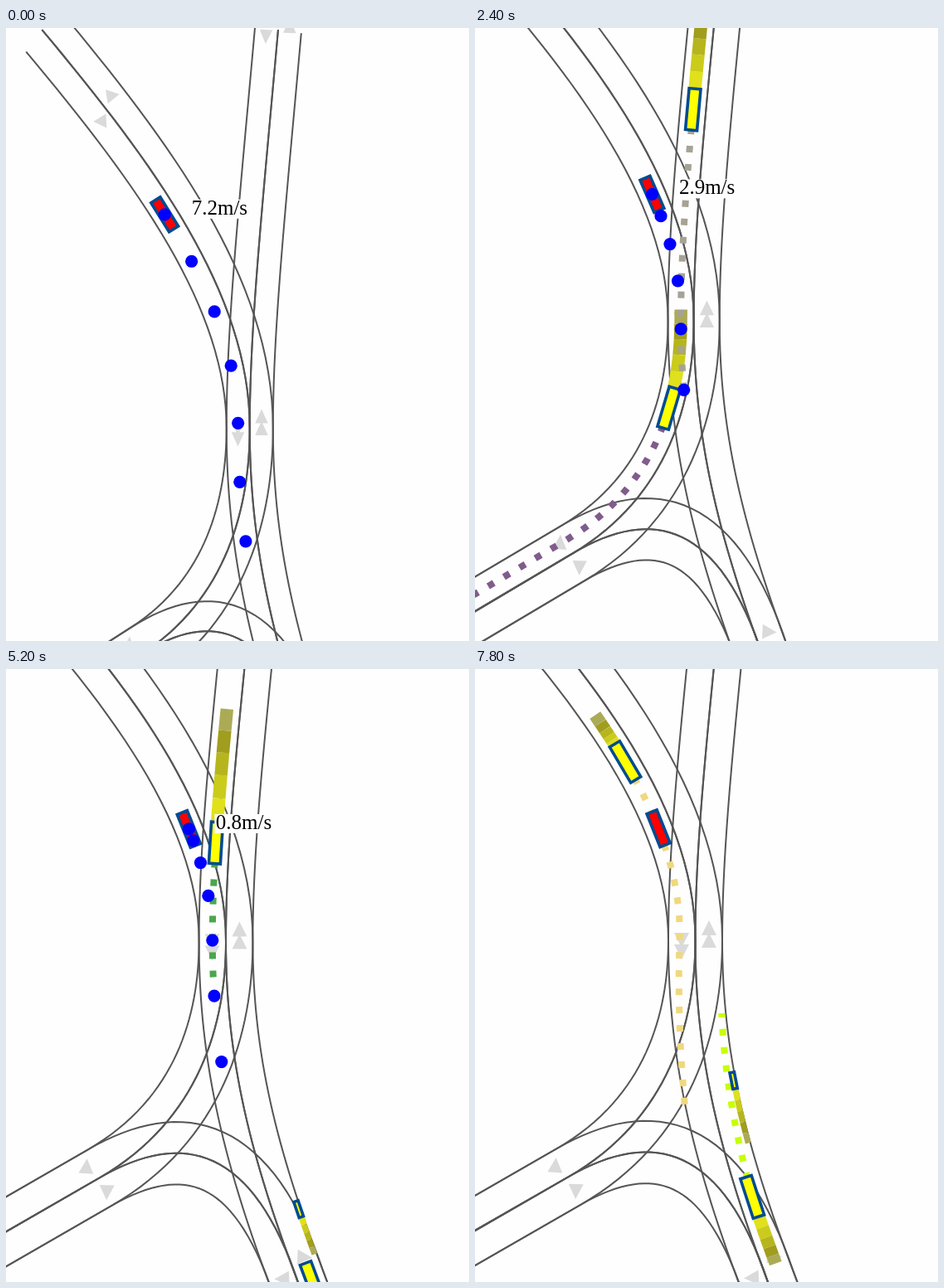
An HTML page with a canvas for the animation above (7.9 s loop, 558x739 px).

```html
<!DOCTYPE html>
<html>
<head>
<meta charset="utf-8">
<title>Merging traffic</title>
<style>
html, body { margin: 0; width: 100%; height: 100%; overflow: hidden; background: #fefefe; }
canvas { display: block; }
</style>
</head>
<body>
<canvas id="stage" width="558" height="739"></canvas>
<script>
const ctx = document.getElementById('stage').getContext('2d');
const LOOP = 7900, STEP = 100, STOP = 5.7;
const LANE = 32.5, ASPECT = 1.16; // the map is a little taller than wide

// Cubic curve as a list of points
function curve(a, b, c, d) {
  return Array.from({ length: 33 }, (_, i) => {
    const u = i / 32, v = 1 - u;
    return [0, 1].map(k => v * v * v * a[k] + 3 * u * v * v * b[k] + 3 * u * u * v * c[k] + u * u * u * d[k]);
  });
}

// Parallel curve to the right of the direction of travel
function offset(pts, dist) {
  return pts.map(([x, y], i) => {
    const a = pts[Math.max(0, i - 1)], b = pts[Math.min(pts.length - 1, i + 1)];
    const dx = b[0] - a[0], dy = (b[1] - a[1]) / ASPECT, n = dist / Math.hypot(dx, dy);
    return [x - dy * n, y + dx * n * ASPECT];
  });
}

const merge = [265.5, 327], fork = [113, 612], westEnd = [-80, 723], southEnd = [353, 739];
const northIn = curve([305.2, -174], [283, 50], [265.5, 200], merge);
const westIn = curve([-25, -174], [131, -6], [265.5, 157], merge);
const southOut = [...curve(merge, [265.5, 470], [296, 589], southEnd), [371, 787]];
const westOut = [...curve(merge, [265.5, 425], [234.4, 542], fork), westEnd];
const bend = [westEnd, ...curve(fork, [215.3, 553], [298, 576], southEnd), [371, 787]];
const join = (a, b) => [...a, ...b.slice(1)];
const roads = [join(northIn, southOut), join(westIn, westOut), bend];

// A lane that can be looked up by distance or by height
function makeRoute(centre, side = LANE / 2) {
  const pts = offset(centre, side), sum = [0];
  for (let i = 1; i < pts.length; i++)
    sum[i] = sum[i - 1] + Math.hypot(pts[i][0] - pts[i - 1][0], pts[i][1] - pts[i - 1][1]);
  const lerp = (i, u) => [0, 1].map(k => pts[i][k] + (pts[i + 1][k] - pts[i][k]) * u);
  const down = pts[0][1] < pts[pts.length - 1][1];
  return {
    at(s) {
      let i = 0;
      while (i < pts.length - 2 && s > sum[i + 1]) i++;
      return lerp(i, (s - sum[i]) / (sum[i + 1] - sum[i]));
    },
    find(y) {
      let i = 0;
      while (i < pts.length - 2 && (down ? y > pts[i + 1][1] : y < pts[i + 1][1])) i++;
      return sum[i] + (y - pts[i][1]) / (pts[i + 1][1] - pts[i][1]) * (sum[i + 1] - sum[i]);
    }
  };
}
const northToSouth = makeRoute(roads[0]);
const northToWest = makeRoute(join(northIn, westOut));
const westToSouth = makeRoute(join(westIn, southOut));
const northbound = [...roads[0]].reverse();
const southToNorth = makeRoute(northbound);
const shoulder = makeRoute(northbound, 30);

// A car passes height y at time t with speed v and acceleration a.
// Forecasts: [from, to, end height, linear drift, cubic drift, route]
const cars = [
  { from: .1, to: 3.3, color: '#805c8c', route: northToWest, t: 1.7, y: 366, v: 92.6, a: 20.7,
    forecasts: [[0, 1.25, 569, 0, 5e-7, northToSouth], [1.25, 2.95, 700, 0, 0]] },
  { from: .1, to: 5.15, color: '#a6a396', route: northToSouth, t: 1.7, y: -1.7, v: 96.3, a: 18,
    forecasts: [[0, 1.25, -13, 0, 0], [1.25, 2.4, 680, .11, -3.4e-7], [2.4, 6, 424, 0, 0]] },
  { from: 2.5, to: 6.25, color: '#4ca64c', route: northToSouth, t: 5.2, y: 208, v: 146, a: 18,
    forecasts: [[0, 8, 379, 0, 0]] },
  { from: 4, to: 8, color: '#f0d880', route: westToSouth, t: 7.8, y: 112, v: 24, a: -36,
    forecasts: [[0, 7.45, 760, 0, -2.2e-7], [7.45, 8, 527, 0, -2.2e-7]] },
  { from: 1, to: 8, color: '#ff0090', route: shoulder, t: 7.1, y: 543, v: 65.9, a: 7.6, len: 20, wide: 5.5,
    forecasts: [[6.2, 7.45, -30, -.085, 4.85e-7]] },
  { from: 4.3, to: 8, color: '#c8ff00', route: southToNorth, t: 7.1, y: 678.5, v: 55.5, a: 23,
    forecasts: [[7.45, 8, 415, .05, 0]] }
].map(c => ({ len: 50, wide: 14, ...c }));

// Key poses: time, zoom, left, top, own height, speed, then the plan: dots, gap, gap change, gap curve
const keys = [
  [0, .862, 64.9, 168.9, 58.3, 7.2, 7, 67, 1, 0],
  [.8, .883, 41, 115, 104.6, 6.4, 7, 53, -16, 2.9],
  [1.7, .917, 21.4, 61.8, 150.3, 4.8, 6, 38, -8, 2.8],
  [3.1, .985, 2.9, 10.2, 186, 1.5, 6, 22, 15.5, 0],
  [5.2, .997, .3, 1.8, 191.3, .8, 7, 15, 13, 0],
  [STOP, 1, 0, 0, 192.3, 0, 7, 15, 13, 0]
];

// Lane arrows: x, y, heading in degrees
const arrows = [
  [282, 312, -90], [282, 327, -90], [249, 327, 90], [249, 341, 90],
  [97, 598, -86], [121.5, 630, 92], [333, 734, 177], [361, 708, 3],
  [74.4, -91.4, -10], [56, -59, 177], [288, -165, 92], [321.5, -179, -88]
];

// Monotone cubic through the key poses
function pose(t, k) {
  t = Math.min(t, STOP);
  const last = keys.length - 1;
  let i = 0;
  while (i < last - 1 && t > keys[i + 1][0]) i++;
  const slope = j => (keys[j + 1][k] - keys[j][k]) / (keys[j + 1][0] - keys[j][0]);
  const tangent = j => {
    if (j === 0) return slope(0);
    if (j === last) return slope(last - 1);
    const a = slope(j - 1), b = slope(j);
    return a * b <= 0 ? 0 : 2 * a * b / (a + b);
  };
  const h = keys[i + 1][0] - keys[i][0], u = (t - keys[i][0]) / h, v = 1 - u;
  return keys[i][k] * (1 + 2 * u) * v * v + tangent(i) * h * u * v * v
       + keys[i + 1][k] * u * u * (3 - 2 * u) - tangent(i + 1) * h * u * u * v;
}

let cam;
const project = ([x, y]) => [cam.zx * x + cam.left, cam.zy * y + cam.top];

function trace(pts) {
  ctx.beginPath();
  pts.forEach(p => ctx.lineTo(...project(p)));
}

function drawRoad(centre) {
  // The centre belongs to both lanes, so it is drawn twice
  for (const side of [-LANE, 0, 0, LANE]) {
    trace(offset(centre, side));
    ctx.stroke();
  }
}

function drawArrow([x, y, deg]) {
  const a = deg * Math.PI / 180, c = 9 * Math.cos(a), s = 9 * Math.sin(a);
  trace([[x + c, y + s], [x - c - s, y - s + c], [x - c + s, y - s - c]]);
  ctx.fill();
}

function drawBody(route, s, len, wide, fill) {
  const [x, y] = project(route.at(s));
  const a = project(route.at(s - len / 2)), b = project(route.at(s + len / 2));
  ctx.save();
  ctx.translate(x, y);
  ctx.rotate(Math.atan2(b[1] - a[1], b[0] - a[0]));
  ctx.fillStyle = fill;
  ctx.strokeStyle = '#004b91';
  ctx.lineWidth = 3.6;
  ctx.beginPath();
  ctx.rect(-len / 2, -wide / 2, len, wide);
  ctx.fill();
  ctx.stroke();
  ctx.restore();
}

function travelled(car, t) {
  let dt = t - car.t;
  if (car.a > 0) dt = Math.max(dt, -car.v / car.a); // waits before setting off
  return car.route.find(car.y) + car.v * dt + car.a * dt * dt / 2;
}

const trailColors = ['#e0e01c', '#cbcb1c', '#b6b51d', '#a19d1e', '#abab56'];

// One second of history behind the rear bumper
function drawTrail(car, t) {
  const rear = i => car.route.at(travelled(car, t - i * .2) - car.len / 2);
  ctx.lineWidth = car.wide + 1.5;
  trailColors.forEach((color, i) => {
    ctx.strokeStyle = color;
    trace([rear(i), rear(i + 1)]);
    ctx.stroke();
  });
}

function drawForecast(car, t) {
  const f = car.forecasts.find(f => t >= f[0] && t < f[1]);
  const here = car.route.at(travelled(car, t)), top = project(here)[1];
  if (!f || top < 0 || top > 739) return;
  const [, , endY, linear, cubic, route = car.route] = f;
  const start = route.find(here[1]), len = route.find(endY) - start, pts = [];
  for (let i = 0; i <= 60; i++) {
    const d = len * i / 60, [x, y] = route.at(start + d);
    pts.push([x + linear * d + cubic * d * d * d, y]);
  }
  if (len <= 0) return;
  ctx.strokeStyle = car.color;
  ctx.lineWidth = 8;
  ctx.setLineDash([8, 14]);
  trace(pts);
  ctx.stroke();
  ctx.setLineDash([]);
}

function drawPlan(s, dots, gap, change, bow) {
  ctx.fillStyle = '#00f';
  for (let i = 0; i < dots; i++) {
    ctx.beginPath();
    ctx.arc(...project(westToSouth.at(s)), 7.6, 0, 7);
    ctx.fill();
    s += (gap + change * i + bow * i * i) / cam.zy;
  }
}

function drawSpeed([x, y], speed) {
  const label = speed.toFixed(1) + 'm/s';
  ctx.font = '25px "Liberation Serif", "Times New Roman", serif';
  ctx.fillStyle = '#fefefe';
  ctx.fillRect(x + 31, y - 18, ctx.measureText(label).width + 3, 23);
  ctx.fillStyle = '#000';
  ctx.fillText(label, x + 32.5, y);
}

function draw(t) {
  const [zoom, left, top, ownY, speed, dots, ...gaps] = [1, 2, 3, 4, 5, 6, 7, 8, 9].map(k => pose(t, k));
  cam = { zx: zoom, zy: 1 - .3 * (1 - zoom), left, top };
  ctx.fillStyle = '#fefefe';
  ctx.fillRect(0, 0, 558, 739);

  ctx.fillStyle = '#dadada';
  arrows.forEach(drawArrow);
  ctx.strokeStyle = '#555';
  ctx.lineWidth = 2;
  roads.forEach(drawRoad);

  const live = cars.filter(c => t >= c.from && t < c.to);
  live.forEach(c => drawTrail(c, t));
  live.forEach(c => drawForecast(c, t));
  live.forEach(c => drawBody(c.route, travelled(c, t), c.len, c.wide, '#ff0'));

  const own = westToSouth.find(ownY);
  drawBody(westToSouth, own, 43 * cam.zy, 13, '#f00');
  if (t < STOP) {
    drawPlan(own, Math.round(dots), ...gaps);
    drawSpeed(project(westToSouth.at(own)), speed);
  }
}

const start = performance.now();
function frame() {
  const ms = (performance.now() - start) % LOOP;
  draw(Math.floor(ms / STEP) * STEP / 1000);
  requestAnimationFrame(frame);
}
frame();
</script>
</body>
</html>
```
